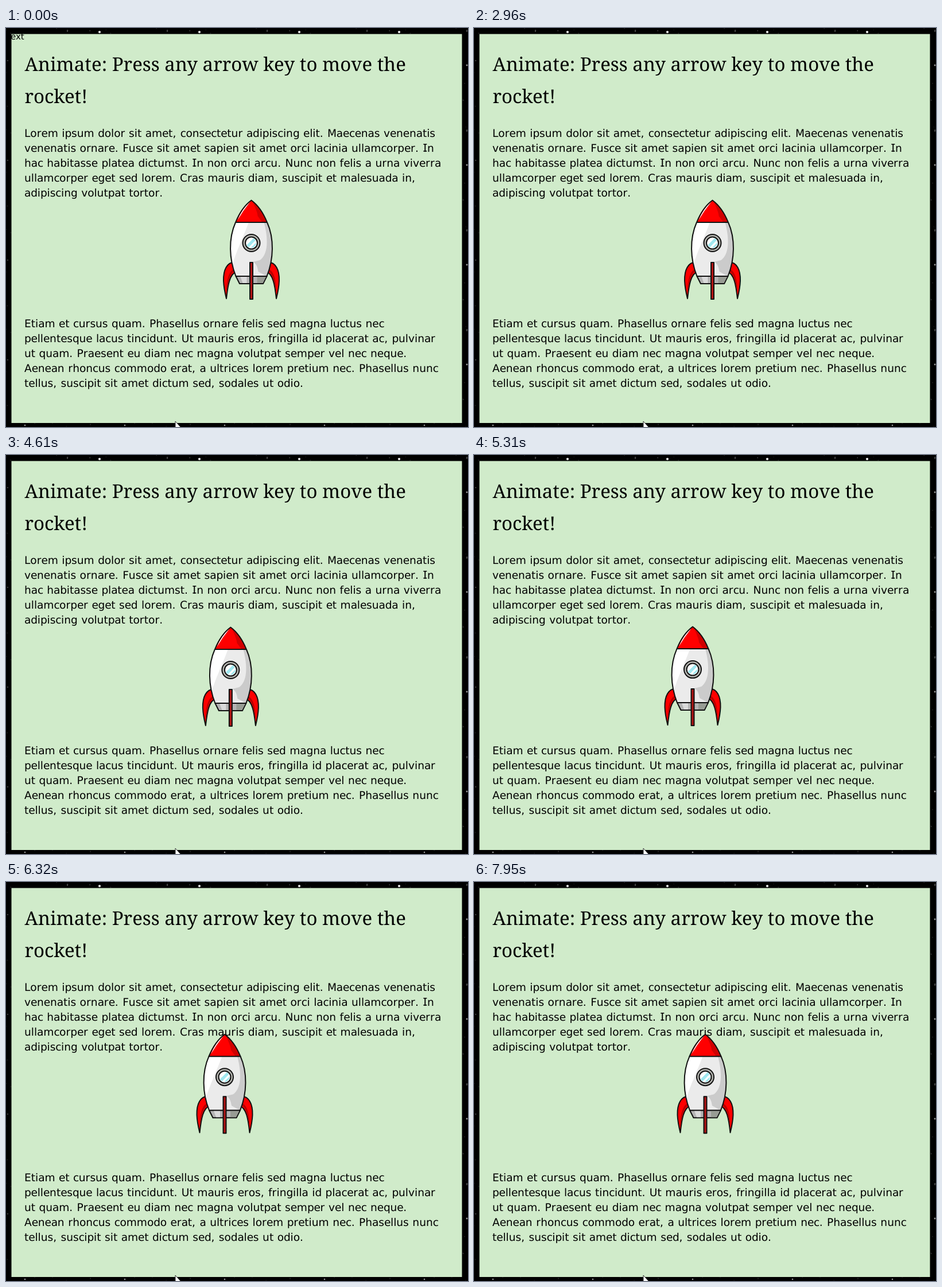
Recreate the animation shown at these times as an HTML page. Size 805 by 696 pixels, loop 8000 ms.

```html
<!DOCTYPE html>
<html lang="en">
<head>
<meta charset="utf-8">
<title>Rocket</title>
<style>
  html, body { margin: 0; width: 100%; height: 100%; overflow: hidden; background: #000; }
  svg { display: block; position: absolute; left: 0; top: 0; }
  text { text-rendering: geometricPrecision; white-space: pre; }
  .head { font: 33px "Noto Serif", serif; }
  .body { font: 18.6px "DejaVu Sans", sans-serif; }
  .tag { font: 15px "DejaVu Sans", sans-serif; }
</style>
</head>
<body>
<svg width="805" height="696" viewBox="0 0 805 696">
  <rect width="805" height="696"/>
  <g id="stars"></g>
  <rect x="9.500" y="10.500" width="785" height="678.500" fill="#d0ebca"/>
  <text class="head" x="32.5" y="75">Animate: Press any arrow key to move the</text>
  <text class="head" x="32.5" y="131">rocket!</text>
  <g id="copy" class="body"></g>
  <text id="tag" class="tag" x="8" y="20">ext</text>

  <g id="rocket" stroke="#111" stroke-width="2" stroke-linejoin="round">
    <g id="fin">
      <path fill="#f00" d="M-30 109.500C-42 110-49 122-48.500 142C-48 155-45 167-43.500 173C-41 150-38 130-26 126Z"/>
      <path fill="#b80000" stroke="none" d="M-43.500 166C-42 146-38 129-28 124L-29 121C-39 124-44 140-43.500 166Z"/>
    </g>
    <use href="#fin" transform="scale(-1 1)"/>
    <path fill="#b4b4b4" d="M-27 134H27L20.500 147H-20.500Z"/>
    <path fill="#dadada" stroke="none" d="M-19 135H-8V146H-15Z"/>
    <path fill="#989c94" stroke="none" d="M10 135H25.500L20 146H10Z"/>
    <path fill="#ebebeb" stroke="none" d="M-27.500 40C-40 68-39 104-27 134H27C39 104 40 68 27.500 40Z"/>
    <path fill="#fff" stroke="none" d="M-27 41C-38 66-38 92-33 114C-27 92-14 66-5 41Z"/>
    <path fill="#cbcbcb" stroke="none" d="M22 40C30 70 29 96 15 106L3 109C9 112 11 119 12 126L27 134C39 104 40 68 27.500 40Z"/>
    <path fill="none" d="M-27.500 40C-40 68-39 104-27 134H27C39 104 40 68 27.500 40"/>
    <path fill="#f00" stroke="none" d="M0 1.500Q-17 14-27.500 40H27.500Q17 14 0 1.500Z"/>
    <path fill="#d00000" stroke="none" d="M1 2C7 14 11 24 11 29L19 40H27.500Q17 14 1 2Z"/>
    <path fill="#fff" stroke="none" d="M-2 4Q-16 16-24 36Q-14 19-2 4Z"/>
    <path fill="none" d="M0 1.500Q-17 14-27.500 40H27.500Q17 14 0 1.500Z"/>
    <circle cy="76" r="15" fill="#b5b5b0"/>
    <circle cy="76" r="10.500" fill="#fff"/>
    <path stroke="none" fill="#a0e8f0" d="M-8.500 80L4 67.500L7.500 71L-4.500 83.500Z"/>
    <path stroke="none" fill="#a0e8f0" d="M-1 84.500L8.500 75L8 79.500L3.500 84Z"/>
    <rect x="-2.500" y="110" width="5" height="64" fill="#b01414"/>
  </g>

  <path fill="#fff" stroke="#111" stroke-width=".8" d="M295 686V706L305 697Z"/>
</svg>
<script>
const LOOP = 8000;
const FONT_SIZE = 18.6;
const NS = "http://www.w3.org/2000/svg";
const byId = id => document.getElementById(id);

function add(parent, tag, attrs, text) {
  const el = document.createElementNS(NS, tag);
  for (const key in attrs) el.setAttribute(key, attrs[key]);
  if (text) el.textContent = text;
  parent.appendChild(el);
}

// Star field: one tile repeated every 174 px
function drawStars() {
  const tile = 174, stars = byId("stars");
  let seed = 11;
  const rnd = () => (seed = seed * 16807 % 2147483647) / 2147483647;
  const dots = [[163, 7, 2.1, .95], [33, 171, 1.3, .6], [107, 6, 1, .3], [107, 65, 1.4, .6]];
  for (let i = 0; i < 70; i++) dots.push([rnd() * tile, rnd() * tile, .5 + rnd() * .7, .1 + rnd() * .2]);
  for (let x = 0; x < 805; x += tile)
    for (let y = 0; y < 696; y += tile)
      for (const [dx, dy, r, a] of dots)
        add(stars, "circle", { cx: x + dx, cy: y + dy, r, fill: "#fff", opacity: a });
}

// Body copy is set with Verdana's advances (in em) where DejaVu's differ
const ctx = document.createElement("canvas").getContext("2d");
ctx.font = FONT_SIZE + 'px "DejaVu Sans", sans-serif';
const groups = { bdgpq: .623, a: .601, c: .521, e: .596, o: .607, r: .427, " ": .352, ".,": .364, I: .421, M: .843 };

function advance(c) {
  const group = Object.keys(groups).find(g => g.includes(c));
  return group ? groups[group] * FONT_SIZE : ctx.measureText(c).width;
}

function setLine(line, y) {
  let x = 32;
  const xs = [];
  for (const c of line) {
    xs.push((c === "I" ? x + 1.2 : x).toFixed(2));
    if (c === "I") add(byId("copy"), "path", { d: `M${x + 1} ${y - 12.8}h6M${x + 1} ${y - .7}h6`, stroke: "#000", "stroke-width": 1.4 });
    x += advance(c);
  }
  add(byId("copy"), "text", { x: xs.join(" "), y }, line);
}

function setParagraph(lines, y) {
  lines.forEach((line, i) => setLine(line, y + i * 26));
}

drawStars();
setParagraph([
  "Lorem ipsum dolor sit amet, consectetur adipiscing elit. Maecenas venenatis",
  "venenatis ornare. Fusce sit amet sapien sit amet orci lacinia ullamcorper. In",
  "hac habitasse platea dictumst. In non orci arcu. Nunc non felis a urna viverra",
  "ullamcorper eget sed lorem. Cras mauris diam, suscipit et malesuada in,",
  "adipiscing volutpat tortor."
], 189.5);
setParagraph([
  "Etiam et cursus quam. Phasellus ornare felis sed magna luctus nec",
  "pellentesque lacus tincidunt. Ut mauris eros, fringilla id placerat ac, pulvinar",
  "ut quam. Praesent eu diam nec magna volutpat semper vel nec neque.",
  "Aenean rhoncus commodo erat, a ultrices lorem pretium nec. Phasellus nunc",
  "tellus, suscipit sit amet dictum sed, sodales ut odio."
], 521.5);

// Key presses: first step, last step, step count, dx, dy
const moves = [
  [2900, 2960, 2, -12, 0],
  [3590, 3660, 2, -11.2, 0],
  [4080, 4300, 4, -12, 0],
  [4610, 4760, 3, -11.3, 0],
  [5310, 5460, 3, 0, -11.5],
  [5690, 5920, 4, 0, -11.6],
  [6170, 6320, 3, 0, -11.7],
  [7560, 7716, 3, 11, 0],
  [7794, 7950, 3, 11, 0]
];

function progress(t, start, end, steps) {
  if (t < start) return 0;
  const i = Math.min(steps - 1, Math.floor((t - start) / (end - start) * (steps - 1) + 1e-6));
  return .5 - Math.cos(Math.PI * (i + .45) / (steps - .55)) / 2;
}

function render(t) {
  let x = 427.5, y = 299;
  for (const [start, end, steps, dx, dy] of moves) {
    const p = progress(t, start, end, steps);
    x += dx * p;
    y += dy * p;
  }
  byId("rocket").setAttribute("transform", `translate(${x} ${y})`);
  byId("tag").setAttribute("visibility", t < 70 ? "visible" : "hidden");
}

let origin;
function tick(now) {
  if (origin === undefined) origin = now;
  render((now - origin) % LOOP);
  requestAnimationFrame(tick);
}
render(0);
requestAnimationFrame(tick);
</script>
</body>
</html>
```
